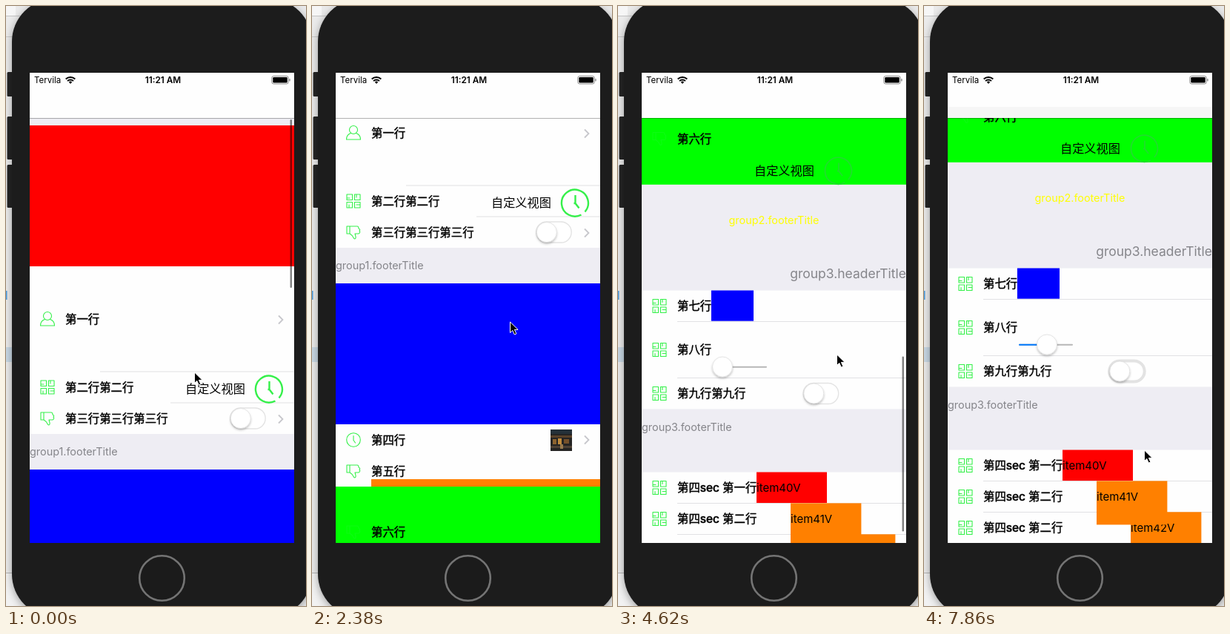
Animation, 405 px wide and 809 px high, one loop 8000 ms. Source, as an HTML page:

```html
<!DOCTYPE html>
<html lang="zh">
<head>
<meta charset="utf-8">
<title>Table view</title>
<style>
html, body { margin: 0; width: 100%; height: 100%; overflow: hidden; background: #e9e9e9; }
svg { display: block; width: 100%; height: 100%; }
text { font-family: Inter, "Noto Sans CJK SC", "Noto Sans CJK", sans-serif; white-space: pre; }
.row { font-size: 15.4px; font-weight: 500; stroke: #000; stroke-width: .4; }
.view { font-size: 16.2px; }
.item { font-size: 15px; }
.foot { font-size: 14.4px; fill: #85858a; }
.head { font-size: 17.5px; fill: #85858a; text-anchor: end; }
.icon { fill: none; stroke: #35f04a; stroke-width: 1.1; stroke-linejoin: round; stroke-linecap: round; }
</style>
</head>
<body>
<svg id="stage" viewBox="0 0 405 809" preserveAspectRatio="none"></svg>
<script>
const rect = (x, y, w, h, fill, extra = '') =>
  `<rect x="${x}" y="${y}" width="${w}" height="${h}" fill="${fill}" ${extra}/>`;
const label = (cls, x, y, str, extra = '') => `<text class="${cls}" x="${x}" y="${y}" ${extra}>${str}</text>`;
const line = (x, y) => rect(x, y - 0.5, 389 - x, 1, '#e1e1e4');
const at = (x, y, body, extra = '') => `<g transform="translate(${x} ${y})" ${extra}>${body}</g>`;

const cell = 'M-9-9h7.5v7.5h-7.5z M1.5-9h7.5v7.5h-7.5z M-9 1.5h7.5v7.5h-7.5z M1.5 1.5h7.5v7.5h-7.5z';
const icons = {
  user: '<circle cy="-4" r="5.5"/><path d="M-9.5 9c0-5 3-7.5 6-8.5M9.5 9c0-5-3-7.5-6-8.5M-9.5 9h19"/>',
  grid: `<path d="${cell} M-9-4h4M4-9v4M-6 5v4M4 5h5"/>`,
  thumb: '<path d="M-9-8h4v10h-4zM-5-8h10c2 0 2 2 2 3 2 1 2 2 1 3 1 1 1 3-1 4h-5c1 3 2 7-.5 7-2 0-1-4-6.500-7"/>',
  clock: '<circle r="9.3"/><path d="M0-5.500v6l2.500 3.500"/>'
};
const icon = (name, y, extra = '') => at(56, y, icons[name], `class="icon" ${extra}`);
const row = (name, y, str) => icon(name, y) + label('row', 80, y + 5.5, str);
const chevron = y =>
  `<path d="M368 ${y - 5.5}l5.500 5.500-5.500 5.500" fill="none" stroke="#c7c7cc" stroke-width="1.8"/>`;
const knob = (id = '') => `<circle ${id} r="13.5" fill="#fff" stroke="#d4d4d4" stroke-width=".6" filter="url(#drop)"/>`;
const toggle = (x, y, id) => at(x, y,
  `<rect id="${id}Track" x="-23.800" y="-14" width="47.500" height="28" rx="14" fill="#fff" stroke="#e3e3e3" stroke-width="1.4"/>`
  + at(-9.7, 0, knob(`id="${id}Knob"`)));
const bigClock = (x, y, color, width) => at(x, y,
  `<path d="M13 12.500A18 18 0 1 0 8 16.500M0-10v11l5 6.500M-2 1h2" fill="none" stroke="${color}" stroke-width="${width}"/>`);
const photo = at(322, 822,
  rect(0, 0, 29, 29, '#252423') + rect(0, 8, 29, 3, '#59422a') + rect(3, 13, 5, 7, '#8b6330')
  + rect(10, 12, 5, 8, '#c08a3c') + rect(18, 13, 7, 6, '#75502a') + rect(0, 22, 29, 3, '#4d4135')
  + rect(13, 20, 4, 6, '#9a7a4e') + rect(0, 0, 29, 6, '#243039'));

// Table content, laid out for a scroll offset of zero
const table =
  rect(32, 161, 357, 190, '#f00')
  + rect(32, 351, 357, 226, '#fefefe') + line(127, 493) + line(222, 535)
  + row('user', 422, '第一行') + chevron(423)
  + row('grid', 514, '第二行第二行')
  + label('view', 242, 522, '自定义视图') + bigClock(355.5, 516, '#35f04a', 2.4)
  + row('thumb', 556, '第三行第三行第三行') + toggle(326.5, 556, 'fixed') + chevron(557)
  + label('foot', 32, 606, 'group1.footerTitle')
  + rect(32, 625, 357, 190, '#00f')
  + rect(32, 815, 357, 84, '#fefefe')
  + row('clock', 836, '第四行') + photo + chevron(836)
  + row('thumb', 878, '第五行') + rect(80, 889, 309, 10, '#ff8000')
  + rect(32, 899, 357, 123.3, '#0f0')
  + icon('thumb', 960, 'opacity=".25"') + label('row', 80, 966, '第六行')
  + label('view', 184, 1009, '自定义视图') + bigClock(298, 1003, '#20de2c', 1.8)
  + label('foot', 210.5, 1075, 'group2.footerTitle', 'text-anchor="middle" style="fill:#ff0"')
  + label('head', 389, 1148, 'group3.headerTitle')
  + rect(32, 1165, 357, 160, '#fefefe') + line(80, 1207) + line(80, 1283)
  + row('grid', 1186, '第七行') + rect(125.9, 1165, 57.1, 41.2, '#00f')
  + row('grid', 1245, '第八行')
  + rect(128, 1267.2, 73, 2, '#b7b7b7', 'rx="1"') + rect(128, 1267.2, 0, 2, '#007aff', 'id="fill" rx="1"')
  + at(141, 1268, knob('id="thumb"'))
  + row('grid', 1304, '第九行第九行') + toggle(274, 1304, 'live')
  + label('foot', 32, 1354, 'group3.footerTitle')
  + rect(32, 1410, 357, 126, '#fefefe') + line(80, 1452) + line(80, 1494)
  + row('grid', 1431, '第四sec 第一行') + row('grid', 1473, '第四sec 第二行') + row('grid', 1515, '第四sec 第二行')
  + rect(279, 1493.8, 95.4, 59, '#ff8000') + label('item', 279, 1520.5, 'item42V')
  + rect(233, 1451.9, 95.4, 59, '#ff8000') + label('item', 233, 1478.5, 'item41V')
  + rect(187, 1410, 95, 41.5, '#f00') + label('item', 187, 1436.5, 'item40V');

const desktop =
  rect(0, 0, 405, 809, '#ebebeb') + rect(0, 0, 13, 14, '#f6f6f6') + rect(0, 13, 25, 1, '#c4c4c4')
  + rect(0, 41, 9, 1, '#c9c9c9') + rect(0, 384, 1.5, 12, '#4a9be0') + rect(0, 460, 8, 20, '#c9d8e4')
  + rect(0, 764, 12, 1, '#b5b5b5') + rect(0, 765, 60, 44, '#f2f2f2');

const phone =
  [[89, 33], [149, 58], [214, 58]].map(([y, h]) => rect(1.5, y, 9, h, '#242424', 'rx="1.5"')).join('')
  + rect(8, -10, 405, 834, '#1b1b1b', 'rx="58" filter="url(#shade)"')
  + '<circle cx="210.5" cy="771.5" r="30.3" fill="#1b1b1b" stroke="#747474" stroke-width="2.6"/>';

const bars =
  rect(32, 90, 357, 61, '#fefefe') + rect(32, 136, 357, 15, '#f6f6f6', 'id="haze"')
  + rect(32, 151, 357, 1, '#000', 'opacity=".3"')
  + label('', 38, 104, 'Tervila', 'font-size="11.500"')
  + at(87, 104.5, '<path d="M-6.300-6a9 9 0 0 1 12.600 0M-4-3.400a5.700 5.700 0 0 1 8 0" fill="none" stroke="#000" stroke-width="2"/>'
    + '<path d="M0 0.500l-2.200-2.400a3.200 3.200 0 0 1 4.400 0z"/>')
  + label('', 212, 104, '11:21 AM', 'font-size="11.800" font-weight="600" text-anchor="middle"')
  + rect(358.8, 94.5, 22.5, 10.5, 'none', 'rx="2.500" stroke="#8c8c8c"')
  + rect(360.3, 96, 19.5, 7.5, '#000', 'rx="1.200"') + rect(382.3, 98, 1.4, 3.5, '#8c8c8c', 'rx=".7"');

document.getElementById('stage').innerHTML = `
<defs>
  <clipPath id="list"><rect x="32" y="151" width="357" height="573"/></clipPath>
  <filter id="shade"><feDropShadow dx="0" dy="3" stdDeviation="6" flood-opacity=".35"/></filter>
  <filter id="drop" x="-30%" y="-30%" width="160%" height="170%"><feDropShadow dx="0" dy="2" stdDeviation="1.500" flood-opacity=".25"/></filter>
</defs>
${desktop}${phone}
<g clip-path="url(#list)">${rect(32, 151, 357, 573, '#eeedf3')}<g id="table">${table}</g></g>
${bars}
${rect(383.6, 153, 2.4, 236, '#000', 'id="scroller" rx="1.200"')}
<path id="cursor" d="M0 0v14.500l3.300-3.100 2.500 5.600 2.600-1.100-2.500-5.500h4.700z" fill="#000" stroke="#fff" stroke-width="1"/>`;

const LOOP = 8000, STEP = 148.3, TOP = 9, BOTTOM = 812;

// Keys: [step, value...]
const scrollKeys = [[0, 0], [1, 24], [5, 162], [8, 251], [16, 251], [17, 266], [20, 350], [24, 473], [25, 473],
  [26, 479], [28, 600], [32, 842], [33, 866], [34, 880], [35, 880], [36, 882], [37, 865], [38, 836],
  [39, 819], [40, 812], [43, 811.5]];
const barKeys = [[0, 1], [10, 1], [12, 0], [16, 0], [17, 1], [41, 1], [43, 0]];
const cursorKeys = [[0, 255, 494], [1, 257, 490], [5, 293, 432], [8, 275, 430], [16, 268, 426], [17, 270, 440],
  [24, 310, 350], [26, 312, 340], [29, 300, 450], [31, 296, 470], [34, 288, 402], [36, 288, 402], [40, 276, 533],
  [43, 139, 455], [44, 144, 455], [46, 165, 455], [47, 265, 491], [51, 268, 492], [53, 298, 599]];
const sliderKeys = [[43, 0], [44, 5], [46, 25]];
const switchKeys = [[48, 0], [49, 0.6], [50, 1], [51, 1], [52, 0.2], [53, 0]];

function sample(keys, n) {
  const next = keys.findIndex(k => k[0] > n);
  if (next === 0) return keys[0].slice(1);
  if (next < 0) return keys[keys.length - 1].slice(1);
  const a = keys[next - 1], b = keys[next], u = (n - a[0]) / (b[0] - a[0]);
  return a.slice(1).map((v, i) => v + (b[i + 1] - v) * u);
}

const set = (id, attrs) => {
  const el = document.getElementById(id);
  for (const key in attrs) el.setAttribute(key, attrs[key]);
};

function draw(t) {
  const n = Math.floor((t + 4) / STEP);
  const [scroll] = sample(scrollKeys, n);
  set('table', { transform: `translate(0 ${-scroll})` });

  const over = Math.max(0, TOP - scroll, scroll - BOTTOM);
  const size = 236 - over;
  const part = Math.min(1, Math.max(0, (scroll - TOP) / (BOTTOM - TOP)));
  set('scroller', { y: 153 + part * (568 - size), height: size, opacity: sample(barKeys, n)[0] * 0.5 });

  const [x, y] = sample(cursorKeys, n);
  set('cursor', { transform: `translate(${x - 0.5} ${y})` });
  set('haze', { opacity: n >= 40 || (n > 2 && n < 8) ? 1 : 0 });

  const [slide] = sample(sliderKeys, n);
  set('thumb', { cx: slide });
  set('fill', { width: slide });

  const [on] = sample(switchKeys, n);
  const green = n >= 49 && n <= 51;
  set('liveKnob', { cx: on * 19 });
  set('liveTrack', {
    fill: green ? '#4cd964' : '#fff',
    stroke: green ? '#4cd964' : '#e3e3e3',
    'stroke-width': n >= 52 ? 4 : 1.4
  });
}

function tick() {
  draw(performance.now() % LOOP);
  requestAnimationFrame(tick);
}
tick();
</script>
</body>
</html>
```
